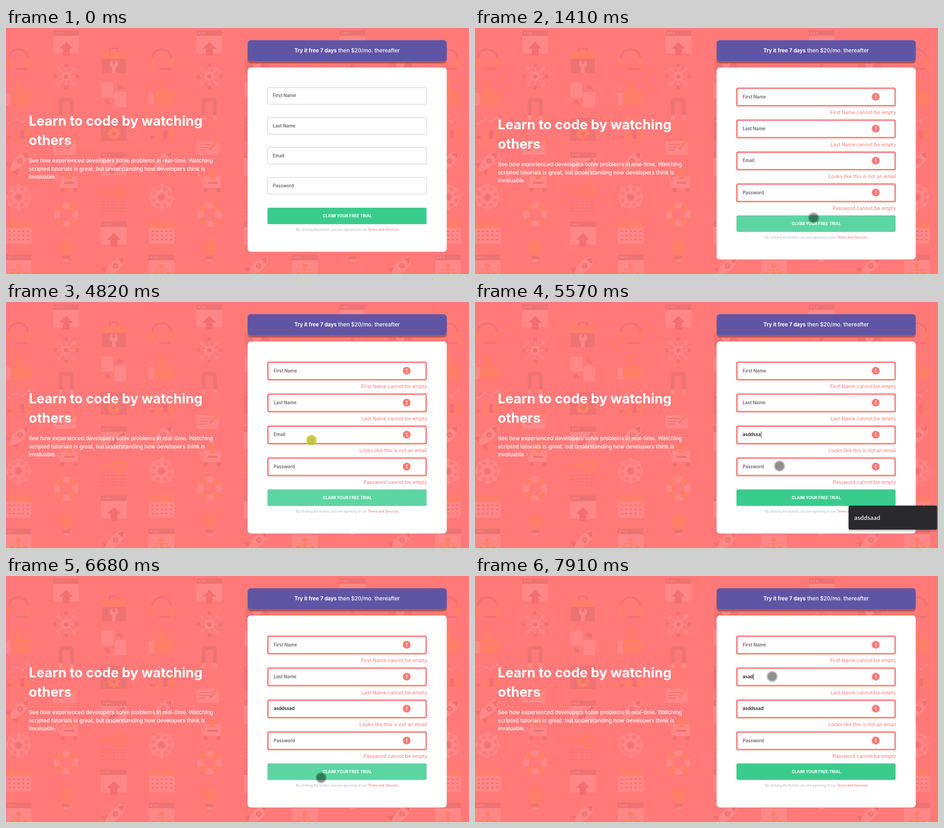
Write an HTML page with a canvas that moves like this. It is 1005 px wide and 534 px high and loops after 8 s.

```html
<!DOCTYPE html>
<html lang="en">
<head>
<meta charset="utf-8">
<title>Sign-up form</title>
<style>
html, body { margin: 0; width: 100%; height: 100%; overflow: hidden; background: #ff7979; }
canvas { display: block; width: 100%; height: 100%; }
</style>
</head>
<body>
<canvas id="stage" width="1005" height="534"></canvas>
<script>
const W = 1005, H = 534, LOOP = 8000, TAU = Math.PI * 2;
const stage = document.getElementById('stage').getContext('2d');
const backdrop = document.createElement('canvas');
backdrop.width = W;
backdrop.height = H;
let c = backdrop.getContext('2d');

const CORAL = '#ff7979', LIGHT = '#ff8787', DARK = '#ee7373', ORANGE = '#ff7e68', RED = '#f56f6f';
const SANS = 'Inter, "Open Sans", sans-serif';

// Drawing helpers
function box(color, x, y, w, h, r = 0) {
  c.fillStyle = color;
  c.beginPath();
  c.roundRect(x, y, w, h, r);
  c.fill();
}
function frame(color, x, y, w, h, r, width) {
  c.strokeStyle = color;
  c.lineWidth = width;
  c.beginPath();
  c.roundRect(x, y, w, h, r);
  c.stroke();
}
function dot(color, x, y, r) {
  c.fillStyle = color;
  c.beginPath();
  c.arc(x, y, r, 0, TAU);
  c.fill();
}
function arc(color, width, r, from = 0, to = TAU) {
  c.strokeStyle = color;
  c.lineWidth = width;
  c.beginPath();
  c.arc(0, 0, r, from, to);
  c.stroke();
}
function line(color, width, x0, y0, x1, y1) {
  c.strokeStyle = color;
  c.lineWidth = width;
  c.beginPath();
  c.moveTo(x0, y0);
  c.lineTo(x1, y1);
  c.stroke();
}
function wedge(color, y, halfWidth, h) {
  c.fillStyle = color;
  c.beginPath();
  c.moveTo(0, y);
  c.lineTo(halfWidth, y + h);
  c.lineTo(-halfWidth, y + h);
  c.fill();
}
function text(str, x, y, color, weight, size, align = 'left', family = SANS) {
  c.font = `${weight} ${size}px ${family}`;
  c.fillStyle = color;
  c.textAlign = align;
  c.fillText(str, x, y);
}
function at(x, y, draw, angle = 0) {
  c.save();
  c.translate(x, y);
  c.rotate(angle);
  draw();
  c.restore();
}
function repeat(n, draw) {
  for (let i = 0; i < n; i++) draw(i);
}
function spokes(n, draw) {
  repeat(n, i => at(0, 0, () => draw(i), i * TAU / n));
}
function arrow(color, size) {
  wedge(color, -size, size, size);
  box(color, -size / 2, 0, size, size);
}

// Backdrop icons, each about 56 px wide around its own centre
function browser(body = LIGHT) {
  box(body, -28, -25, 56, 50);
  box(DARK, -28, -25, 56, 12);
  repeat(3, i => dot(LIGHT, -22 + i * 6, -19, 1.7));
}
function upload() {
  browser();
  at(0, 15, () => arrow(RED, 15));
}
function headset() {
  arc(DARK, 4, 21, Math.PI, 0);
  box(ORANGE, -27, -2, 11, 20, 4);
  box(ORANGE, 16, -2, 11, 20, 4);
  box(DARK, -6, 20, 26, 4, 2);
}
function thumb() {
  box(LIGHT, -28, -1, 11, 27);
  box(ORANGE, -15, -4, 42, 30, 8);
  at(0, -12, () => box(ORANGE, -6, -15, 13, 26, 5), -.2);
}
function chart() {
  const top = i => (i % 2 ? -18 : -9) - i * 2;
  box(ORANGE, -28, 24, 56, 2);
  repeat(4, i => {
    const x = -20 + i * 14;
    box(i % 2 ? ORANGE : RED, x - 4, 17 - i * 6, 9, 7 + i * 6);
    if (i < 3) line(LIGHT, 2, x, top(i), x + 14, top(i + 1));
    dot(LIGHT, x, top(i), 3);
  });
}
function rocket() {
  at(0, 0, () => {
    wedge(RED, -4, 19, 26);
    c.fillStyle = LIGHT;
    c.beginPath();
    c.ellipse(0, -4, 11, 28, 0, 0, TAU);
    c.fill();
    wedge(RED, -32, 8, 13);
    dot(DARK, 0, -5, 6);
    dot(CORAL, 0, -5, 3);
    at(0, 30, () => wedge(ORANGE, -6, 5, 12), Math.PI);
  }, TAU / 8);
}
function badge() {
  arc(LIGHT, 2.5, 24);
  arc(LIGHT, 5, 12);
  spokes(8, () => {
    dot(LIGHT, 24, 0, 4.5);
    box(LIGHT, 13, -3, 6, 6);
  });
  dot(DARK, 0, 0, 6);
}
function calendar() {
  box(LIGHT, -28, -8, 56, 34);
  box(ORANGE, -28, -20, 56, 12);
  repeat(4, i => box(ORANGE, -23 + i * 14, -26, 4, 9, 2));
  repeat(15, i => box(DARK, -22 + i % 5 * 10, -2 + (i / 5 | 0) * 9, 5, 3));
}
function orgChart() {
  browser();
  box(ORANGE, -5, -5, 10, 8);
  box(ORANGE, -1, 0, 2, 14);
  box(ORANGE, -14, 7, 28, 2);
  repeat(3, i => box(ORANGE, -19 + i * 14, 13, 10, 9));
}
function network() {
  spokes(8, i => {
    line(LIGHT, 2, 0, 0, 23, 0);
    dot(i % 2 ? LIGHT : DARK, 24, 0, 4.5);
  });
  dot(LIGHT, 0, 0, 10);
  dot(DARK, 0, 0, 5);
}
function magnet() {
  frame(DARK, -12, -24, 24, 40, 3, 8);
  box(CORAL, -8, 8, 16, 14);
  for (const x of [-16, 8]) box(LIGHT, x, 10, 8, 10);
  repeat(6, i => at(0, 8, () => line(ORANGE, 2, 20, 0, 26, 0), i * TAU / 12));
}
function note() {
  box(LIGHT, -28, -10, 49, 30);
  repeat(3, i => box(DARK, -22, -3 + i * 6, 26 - i * 5, 2));
  at(11, -3, () => {
    box(ORANGE, -3, -18, 6, 28);
    at(0, 16, () => wedge(DARK, 0, 3, 6), Math.PI);
  }, TAU / 9);
}
function cart() {
  line(LIGHT, 3, -26, -24, -12, 16);
  box(LIGHT, -12, -8, 37, 25);
  box(DARK, -4, 4, 22, 4);
  at(7, -14, () => arrow(ORANGE, 12));
  for (const x of [-8, 20]) dot(DARK, x, 22, 5);
}
function lifebuoy() {
  repeat(8, i => arc(i % 2 ? ORANGE : LIGHT, 13, 20, (i - .5) * TAU / 8, (i + .5) * TAU / 8));
}
function bulb() {
  at(0, -6, () => {
    spokes(10, i => { if (i !== 5) line(ORANGE, 2, 0, -19, 0, -25); });
    dot(ORANGE, 0, 0, 15);
  });
  box(ORANGE, -8, 5, 16, 9);
  box(DARK, -8, 14, 16, 8, 2);
  box(LIGHT, -6, 22, 12, 5, 2);
}
function toolbox() {
  frame(DARK, -9, -26, 18, 12, 3, 3);
  box(ORANGE, -26, -18, 52, 15, 2);
  box(DARK, -26, -3, 52, 31);
  dot(LIGHT, 0, 8, 9);
  box(LIGHT, -4, 10, 8, 18);
  box(DARK, -3, -2, 6, 10);
}
function files() {
  spokes(2, () => {
    box(LIGHT, -27, -27, 26, 33, 2);
    wedge(ORANGE, -27, 0, 0);
    at(14, -16, () => arrow(DARK, 7), TAU / 3);
  });
}
function settings() {
  browser(DARK);
  at(0, 9, () => {
    spokes(8, () => box(ORANGE, -3, -14, 6, 7));
    arc(ORANGE, 7, 8);
  });
}
function paint() {
  browser();
  line(RED, 7, 2, 9, 22, -10);
  dot(DARK, -3, 14, 8);
}
function key() {
  at(13, -15, () => arc(ORANGE, 9, 11));
  box(ORANGE, -28, -18, 32, 7);
  box(ORANGE, -28, -11, 6, 5);
  c.setLineDash([10, 3, 5, 3]);
  repeat(4, i => line(DARK, 1.6, -28, 7 + i * 7, 28, 7 + i * 7));
  c.setLineDash([]);
}

function paintBackdrop() {
  const columns = [
    [67, headset, thumb, chart, rocket, badge, calendar, orgChart],
    [30, upload, network, magnet, note, cart, lifebuoy, bulb],
    [70, toolbox, files, settings, paint, key, upload, rocket]
  ];
  box(CORAL, 0, 0, W, H);
  repeat(10, col => {
    const [top, ...icons] = columns[col % 3];
    icons.forEach((icon, row) => at(27 + col * 103.6, top + row * 75, icon));
  });
}

// Pointer stops: arrival and departure times, place, and when the button is pressed
const stops = [
  { at: 0, leave: 320, x: 748, y: 546 },
  { at: 1060, leave: 1880, x: 735, y: 412, press: 1200 },
  { at: 2360, leave: 4960, x: 663, y: 300, press: 4820 },
  { at: 5430, leave: 5640, x: 661, y: 356 },
  { at: 6190, leave: 6330, x: 668, y: 392 },
  { at: 6680, leave: 6830, x: 684, y: 438, press: 6750 },
  { at: 7350, leave: 7560, x: 655, y: 234, press: 7490 },
  { at: 7910, leave: LOOP, x: 645, y: 218 }
];
const PRESS = 140, ERRORS_AT = 1340, EMAIL_AT = 4960, LAST_AT = 7560;

const between = (t, a, b) => t >= a && t < b;
const clamp = v => Math.max(0, Math.min(1, v));
const easeOut = u => 1 - (1 - u) ** 3;
const typed = (str, t, start, step) => str.slice(0, Math.max(0, Math.floor((t - start) / step)));

function pointerAt(t) {
  const i = stops.findIndex(s => t < s.leave), to = stops[i], from = stops[i - 1] || to;
  const e = easeOut(clamp((t - from.leave) / (to.at - from.leave)));
  return t >= to.at ? [to.x, to.y] : [from.x + (to.x - from.x) * e, from.y + (to.y - from.y) * e];
}

function drawIntro(shift) {
  text('Learn to code by watching', 49.5, 212 + shift, '#fff', 700, 29.3);
  text('others', 49.5, 254 + shift, '#fff', 700, 29.3);
  ['See how experienced developers solve problems in real-time. Watching',
   'scripted tutorials is great, but understanding how developers think is',
   'invaluable.'].forEach((s, i) => text(s, 49.5, 292 + shift + i * 17.5, '#fff', 500, 11.7));
}

function drawBanner() {
  box('#b85656', 524.5, 40, 432.2, 37, 7);
  box('#6055a5', 524.5, 26.5, 432.2, 45.5, 7);
  text('Try it free 7 days', 626, 53, '#fff', 700, 11.3);
  text('then $20/mo. thereafter', 721, 53, '#fff', 500, 11.7);
}

function drawField(i, failed, label, error, value = '', caret = false) {
  const y = failed ? 129 + i * 69.3 : 129.5 + i * 65.2;
  const x = failed ? 581 : 579, mid = y + (failed ? 20.3 : 17.5);
  if (failed) {
    frame(CORAL, 568.5, y + 1.8, 343.5, 38, 2.5, 3);
    dot(CORAL, 869.8, mid, 8.5);
    box('#fff', 869, mid - 4.5, 1.7, 5.8);
    box('#fff', 869, mid + 2.6, 1.7, 1.8);
    text(error, 914, mid + 38, CORAL, 400, 10.7, 'right');
  } else {
    frame('#c8c5da', 567.5, Math.round(y) - .5, 345.5, 36, 3.5, 1);
  }
  text(value || label, x, mid + 3.3, value ? '#1e1e26' : '#66666f', 600, 9.7);
  if (caret) box('#222', x + (value && c.measureText(value).width) + .5, mid - 7, 1, 14);
}

function drawForm(t) {
  const failed = t >= ERRORS_AT, drop = failed ? 16.7 : 0;
  box('#fff', 524.5, 85.7, 432.2, 400 + drop, 7);
  drawField(0, failed, 'First Name', 'First Name cannot be empty');
  drawField(1, failed, 'Last Name', 'Last Name cannot be empty',
    typed('asad', t, LAST_AT, 87), t >= LAST_AT);
  drawField(2, failed, 'Email', 'Looks like this is not an email',
    typed('asddssad', t, EMAIL_AT + 120, 70), between(t, EMAIL_AT, 6170));
  drawField(3, failed, 'Password', 'Password cannot be empty');

  // The highlight stays until another field takes the focus
  const lit = between(t, 720, EMAIL_AT) || between(t, 6400, LAST_AT);
  box(lit ? '#5dd5a2' : '#39cc8d', 567.5, 390 + drop, 345.5, 36, 3);
  frame('rgba(190,190,215,.3)', 568, 390.5 + drop, 344.5, 35, 3, 1);
  text('CLAIM YOUR FREE TRIAL', 740.8, 411.2 + drop, '#fff', 700, 8.75, 'center');
  text('By clicking the button, you are agreeing to our', 629.5, 440 + drop, '#bab7d2', 500, 7);
  text('Terms and Services', 785.5, 440 + drop, CORAL, 500, 7);
}

function drawToast(t) {
  const alpha = clamp((t - 5410) / 70) * clamp((6190 - t) / 70);
  if (!alpha) return;
  c.save();
  c.globalAlpha = alpha;
  c.shadowColor = 'rgba(0,0,0,.35)';
  c.shadowBlur = 5;
  c.shadowOffsetY = 2;
  box('#29292e', 811, 442, 192, 52, 3);
  c.shadowColor = 'transparent';
  text('asddsaad', 823, 472.5, '#f2f2f2', 600, 12.4, 'left', '"Open Sans", sans-serif');
  c.restore();
}

function drawPointer(t) {
  const [x, y] = pointerAt(t);
  const down = stops.some(s => between(t, s.press, s.press + PRESS));
  dot(down ? 'rgba(205,205,40,.6)' : 'rgba(0,0,0,.24)', x, y, 12);
  dot(down ? 'rgba(180,180,40,.6)' : 'rgba(0,0,0,.26)', x, y, 9.5);
}

function render(now) {
  const t = Math.max(0, now) % LOOP;
  c.drawImage(backdrop, 0, 0);
  drawIntro(t >= ERRORS_AT ? 8.3 : 0);
  drawBanner();
  drawForm(t);
  drawToast(t);
  drawPointer(t);
  requestAnimationFrame(() => render(performance.now() - begin));
}

paintBackdrop();
c = stage;
const begin = performance.now();
render(0);
</script>
</body>
</html>
```
